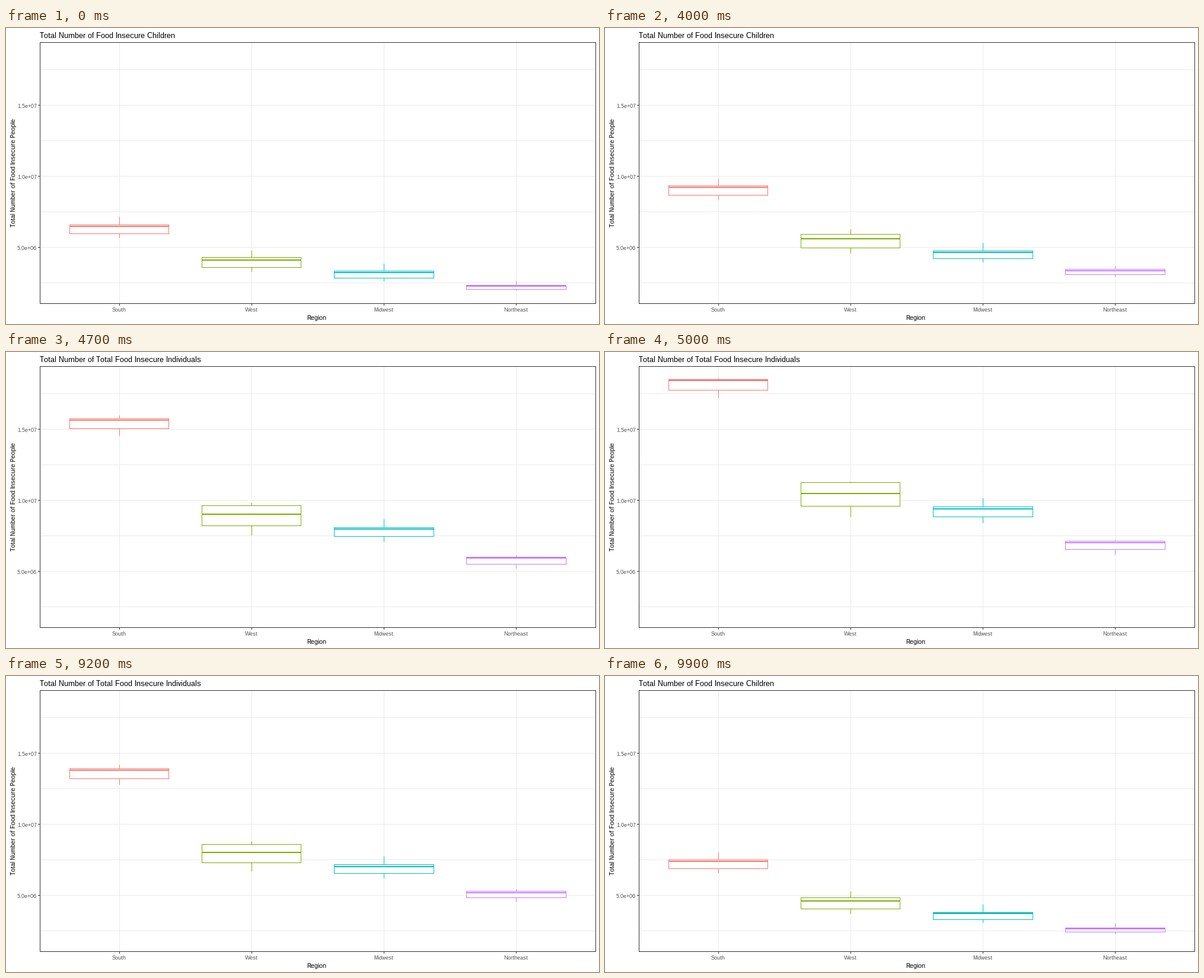
A matplotlib script for the animation above (10 s loop, 1000 by 500 pixels).

```python
import matplotlib.pyplot as plt
import numpy as np
from matplotlib.animation import FuncAnimation
from matplotlib.patches import Rectangle

WIDTH, HEIGHT, DPI = 1000, 500, 100
STEPS, HOLD, FRAMES = 13, 38, 100
GRID, BORDER, TICK_TEXT = "#EBEBEB", "#333333", "#4D4D4D"
TITLES = ("Total Number of Food Insecure Children",
          "Total Number of Total Food Insecure Individuals")

# Millions of people: lower quartile, median, upper quartile, maximum,
# first for children, then for all individuals.
REGIONS = {
    "South": ("#F8766D", (5.958, 6.446, 6.583, 7.133), (17.75, 18.404, 18.5, 18.592)),
    "West": ("#7CAE00", (3.583, 4.092, 4.292, 4.758), (9.583, 10.467, 11.25, 11.3)),
    "Midwest": ("#00BFC4", (2.842, 3.217, 3.333, 3.842), (8.842, 9.375, 9.533, 10.133)),
    "Northeast": ("#C77CFF", (2.05, 2.25, 2.333, 2.633), (6.55, 7.004, 7.125, 7.175)),
}
LOWER_TAILS = (0.64, 0.9)  # lower whisker as a share of median - lower quartile
FIRST_CENTER, SPACING, HALF_BOX = 191, 223.2, 83.7

plt.rcParams.update({
    "font.family": "Liberation Sans",
    "text.hinting": "native",      # whole-pixel glyph advances, no kerning
    "text.hinting_factor": 1,
    "text.kerning_factor": 6,
})
fig = plt.figure(figsize=(WIDTH / DPI, HEIGHT / DPI), dpi=DPI, facecolor="white")
ax = fig.add_axes([0, 0, 1, 1])
ax.set_xlim(0, WIDTH)
ax.set_ylim(HEIGHT, 0)
ax.axis("off")


def row(millions):
    return np.floor(490.5 - 24 * np.asarray(millions)).astype(int)


def bar(x, y, w, h, color, z=1):
    return ax.add_patch(Rectangle((x, y), w, h, facecolor=color, linewidth=0,
                                  antialiased=False, zorder=z))


def label(x, y, text, px, color="black", **style):
    return ax.text(x, y, text, fontsize=px * 72 / DPI, color=color,
                   va="baseline", **style)


def draw_panel():
    for value in np.arange(2.5, 18, 2.5):
        bar(58, row(value), 936, 1, GRID)
    for i, name in enumerate(REGIONS):
        x = int(FIRST_CENTER + SPACING * i)
        bar(x, 25, 1, 440, GRID)
        bar(x, 466, 1, 3, BORDER)
        label(x, 479, name, 9, TICK_TEXT, ha="center")
    for value in (5, 10, 15):
        y = row(value)
        bar(54, y, 3, 1, BORDER)
        label(52, y + 5, f"{value * 1e6:.1e}", 9, TICK_TEXT, ha="right")
    for y in (24, 465):
        bar(57, y, 938, 1, BORDER, 5)
    for x in (57, 994):
        bar(x, 24, 1, 442, BORDER, 5)
    label(524, 493, "Region", 11, ha="center")
    label(16, 245, "Total Number of Food Insecure People", 11,
          rotation=90, rotation_mode="anchor", ha="center")


def with_minimum(summary, tail):
    q1, median = summary[:2]
    return np.array([q1 - tail * (median - q1), *summary])


class Box:
    def __init__(self, index, color, *summaries):
        self.start, self.end = map(with_minimum, summaries, LOWER_TAILS)
        middle = FIRST_CENTER + SPACING * index
        left, center, right = (int(middle + d) for d in (-HALF_BOX, 0, HALF_BOX))
        width = right - left + 1
        self.upper, self.lower = (bar(center, 0, 1, 1, color, 2) for _ in range(2))
        self.fill = bar(left, 0, width, 1, "white", 3)
        self.sides = [bar(x, 0, 1, 1, color, 4) for x in (left, right)]
        self.top, self.bottom, self.median = (
            bar(left, 0, width, 1, color, 4) for _ in range(3))

    def update(self, t):
        low, q1, mid, q3, high = row(self.start + (self.end - self.start) * t)
        spans = [(self.upper, high, q3), (self.lower, q1, low),
                 (self.top, q3, q3 + 1), (self.bottom, q1, q1 + 1),
                 (self.median, mid - 1, mid + 1)]
        spans += [(part, q3, q1 + 1) for part in (self.fill, *self.sides)]
        for part, y0, y1 in spans:
            part.set_y(y0)
            part.set_height(y1 - y0)


draw_panel()
title = label(57, 17, TITLES[0], 13, ha="left")
boxes = [Box(i, *region) for i, region in enumerate(REGIONS.values())]


def progress(frame):
    """Hold, move linearly to the second state, hold, move back."""
    half, k = divmod(frame, FRAMES // 2)
    step = max(0, k - HOLD + 1) / STEPS
    return 1 - step if half else step


def update(frame):
    t = progress(frame)
    title.set_text(TITLES[int(t > 0.5)])
    for box in boxes:
        box.update(t)
    return []


anim = FuncAnimation(fig, update, frames=FRAMES, interval=100,
                     repeat=True, repeat_delay=0, blit=False)
plt.show()
```
